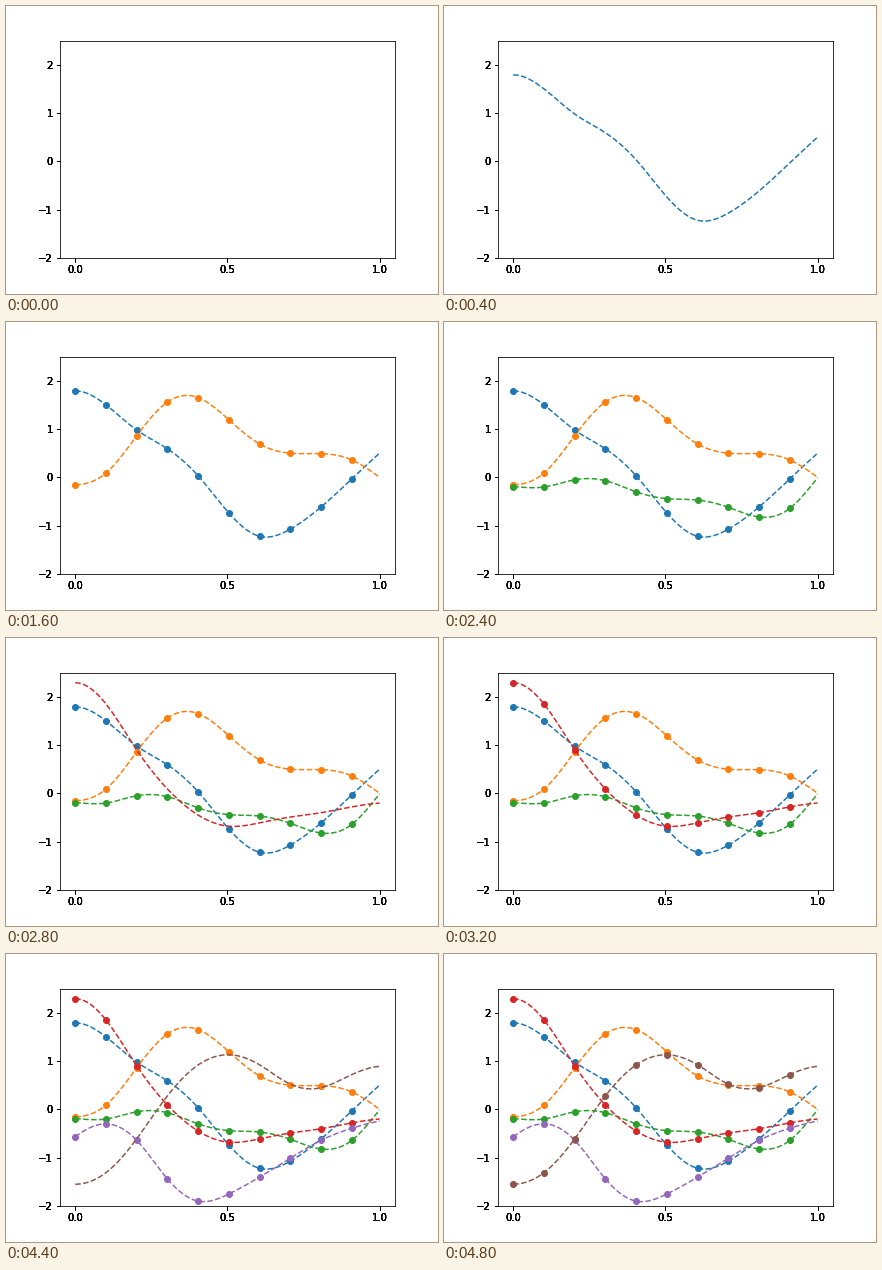
A matplotlib script for the animation above (5.2 s loop, 432 by 288 pixels).

```python
import numpy as np
import matplotlib.pyplot as plt
from matplotlib.animation import FuncAnimation

STEP_MS = 400

X = np.linspace(0, 1, 100)
KNOTS = np.append(X[::10], 1)

# Start slope, values at the knots, end slope.
CURVES = [
    (0, [1.79, 1.50, .98, .59, .03, -.74, -1.22, -1.07, -.61, -.03, .50], 5.6),
    (.2, [-.155, .09, .86, 1.56, 1.65, 1.19, .69, .50, .49, .36, 0], -4.6),
    (-.5, [-.19, -.20, -.05, -.07, -.30, -.44, -.47, -.62, -.82, -.64, -.01], 7.8),
    (0, [2.29, 1.85, .90, .09, -.45, -.68, -.61, -.49, -.40, -.28, -.20], .5),
    (4.8, [-.57, -.30, -.64, -1.44, -1.90, -1.75, -1.40, -1.01, -.64, -.39, -.24], 1.3),
    (.1, [-1.55, -1.31, -.61, .28, .92, 1.13, .92, .52, .45, .72, .89], .5),
]


def spline(start, values, end):
    """Clamped cubic spline through the knots, sampled at X."""
    y = np.array(values)
    h = np.diff(KNOTS)
    d = np.diff(y) / h
    n = len(y)
    a = np.eye(n)
    b = np.zeros(n)
    b[0], b[-1] = start, end
    for i in range(1, n - 1):
        a[i, i - 1:i + 2] = h[i], 2 * (h[i - 1] + h[i]), h[i - 1]
        b[i] = 3 * (h[i] * d[i - 1] + h[i - 1] * d[i])
    m = np.linalg.solve(a, b)
    k = np.clip(np.searchsorted(KNOTS, X, side="right") - 1, 0, n - 2)
    t = (X - KNOTS[k]) / h[k]
    return ((1 + 2 * t) * (1 - t) ** 2 * y[k] + t * (1 - t) ** 2 * h[k] * m[k]
            + t * t * (3 - 2 * t) * y[k + 1] + t * t * (t - 1) * h[k] * m[k + 1])


def set_scale(ax):
    ax.set(xlim=(-.05, 1.05), ylim=(-2, 2.5),
           xticks=[0, .5, 1], yticks=range(-2, 3))
    ax.set_xticklabels(["0.0", "0.5", "1.0"])


plt.rcParams.update({"font.family": "DejaVu Sans", "font.size": 10,
                     "toolbar": "None"})
fig = plt.figure(figsize=(6, 4), dpi=72, facecolor="white")
box = [.125, .125, .775, .755]
ax = fig.add_axes(box)
set_scale(ax)

# Stacked copies of the ticks give the labels their heavy edges.
for _ in range(4):
    layer = fig.add_axes(box, frameon=False)
    set_scale(layer)

parts = []
for i, curve in enumerate(CURVES):
    y = spline(*curve)
    parts += ax.plot(X, y, "--", color=f"C{i}")
    parts += ax.plot(X[::10], y[::10], "o", color=f"C{i}")


def draw(frame):
    for i, part in enumerate(parts):
        part.set_visible(i < frame)
    return parts


anim = FuncAnimation(fig, draw, frames=len(parts) + 1, interval=STEP_MS,
                     init_func=lambda: draw(0), repeat=True, repeat_delay=0)
plt.show()
```
